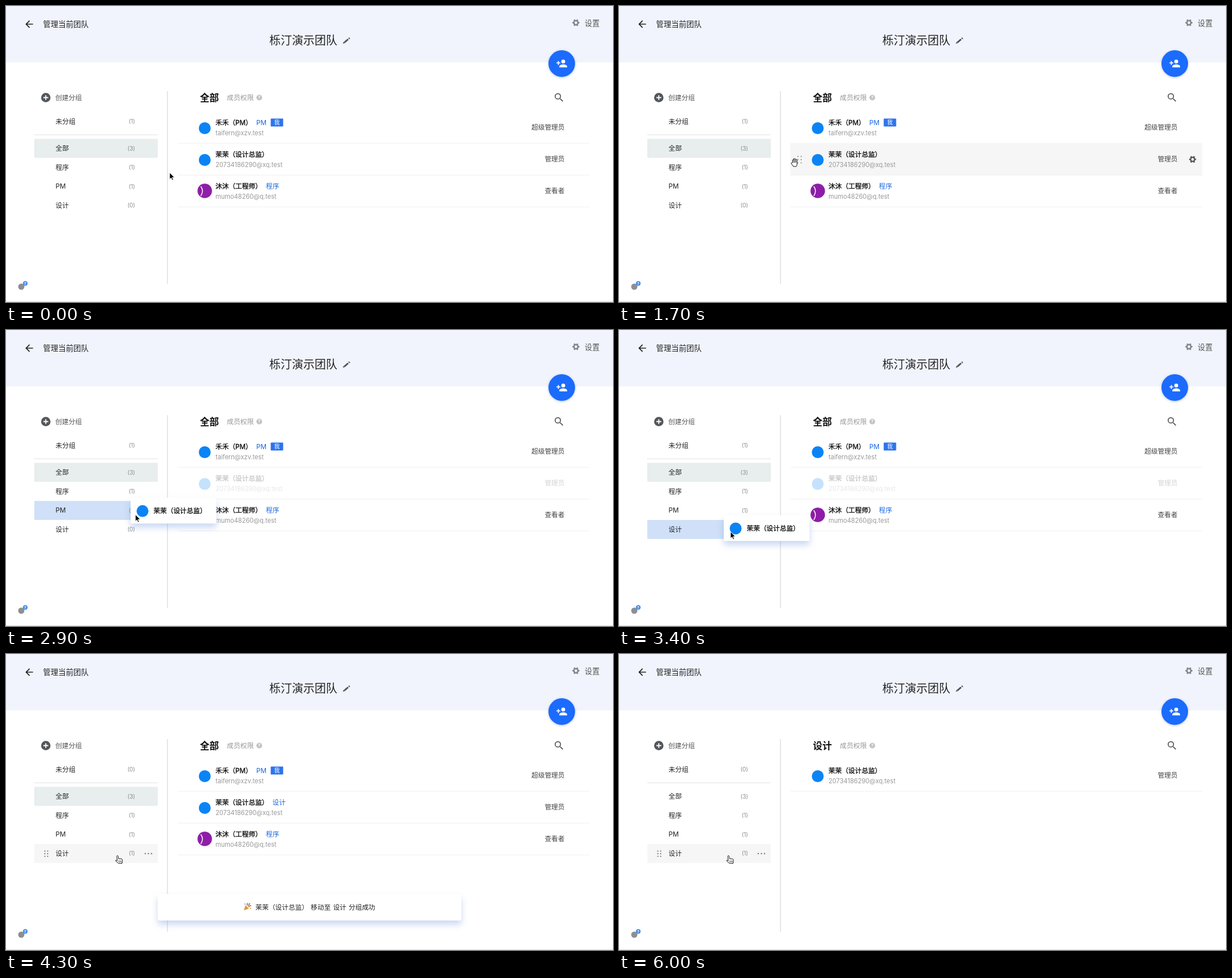
An HTML page that plays this animation: 1072 px wide and 522 px high, repeating every 7.1 s.

```html
<!DOCTYPE html>
<html lang="zh-CN">
<head>
<meta charset="utf-8">
<title>团队管理</title>
<style>
  html, body { margin: 0; width: 100%; height: 100%; overflow: hidden; background: #fff; }
  svg { display: block; width: 1072px; height: 522px; }
  text { font-family: Inter, "Noto Sans CJK SC", "Noto Sans CJK", sans-serif; white-space: pre; }
  .medium { stroke: #111; stroke-width: .35px; }
  .float { filter: drop-shadow(0 7px 6px rgba(80, 125, 215, .3)); }
  .fab { filter: drop-shadow(0 1.5px 2px rgba(20, 50, 120, .3)); }
  .cursor path { stroke-linejoin: round; stroke-linecap: round; }
</style>
</head>
<body>
<svg id="stage" viewBox="0 0 1072 522"></svg>
<script>
const LOOP = 7100, DRAG = 2600, DROP = 3600, OPEN = 5000, TOAST_OUT = 5300;
const BLUE = '#1a66e0', AVATAR = '#0a84f5';

// y is the visual middle of the line
const text = (x, y, str, size = 11.7, fill = '#222', extra = '') =>
  `<text x="${x}" y="${y + size * .37}" font-size="${size}" fill="${fill}" ${extra}>${str}</text>`;
const rect = (x, y, w, h, fill, extra = '') =>
  `<rect x="${x}" y="${y}" width="${w}" height="${h}" fill="${fill}" ${extra}/>`;
const circle = (x, y, r, fill, extra = '') =>
  `<circle cx="${x}" cy="${y}" r="${r}" fill="${fill}" ${extra}/>`;
const icon = (x, y, scale, fill, d) =>
  `<path transform="translate(${x} ${y}) scale(${scale})" fill="${fill}" d="${d}"/>`;
const gear = (x, y, color) =>
  circle(x, y, 3.6, 'none', `stroke="${color}" stroke-width="2.4"`) +
  circle(x, y, 5.3, 'none', `stroke="${color}" stroke-width="1.8" pathLength="12" stroke-dasharray="1" stroke-dashoffset=".5"`);
const grip = (x, y, dx, dy, color) => [0, 1].map(i => [-1, 0, 1].map(j =>
  circle(x + i * dx, y + j * dy, 1.15, color)).join('')).join('');
const group = (id, content, extra = '') => `<g id="${id}" ${extra}>${content}</g>`;
const help = (x, y, r, fill) =>
  circle(x, y, r, fill) + text(x, y, '?', r * 1.6, '#fff', 'text-anchor="middle" font-weight="700"');

const header =
  rect(0, 0, 1072, 99.5, '#f1f4fd') +
  icon(30.9, 21.9, .84, '#222', 'M20 11H7.83l5.59-5.59L12 4l-8 8 8 8 1.41-1.41L7.83 13H20z') +
  text(65.5, 32, '管理当前团队', 13.4) +
  text(465, 61, '栎汀演示团队', 20) +
  '<path d="M597.6 64.3l6.6-5.6M605.4 57.7l1.5-1.3" stroke="#555" stroke-width="2.9"/>' +
  '<path d="M594.8 66.6l1.3-3.6 2.2 2.5z" fill="#555"/>' +
  gear(1006.5, 29.5, '#808388') + text(1022, 30.5, '设置', 13.2, '#555') +
  circle(981.5, 101.5, 23.5, '#1b6bfd', 'class="fab"') +
  icon(971.2, 91, .86, '#fff', 'M15 12a4 4 0 1 0 0-8 4 4 0 0 0 0 8zm-9-2V7H4v3H1v2h3v3h2v-3h3v-2zm9 4c-2.67 0-8 1.34-8 4v2h16v-2c0-2.66-5.33-4-8-4z');

const groups = [['未分组', 203.5], ['全部', 251], ['程序', 284.5], ['PM', 318], ['设计', 351.5]];
const sidebar =
  circle(70.3, 161.5, 8.3, '#53575b') +
  '<path d="M66 161.5h8.6M70.3 157.2v8.6" stroke="#fff" stroke-width="1.8"/>' +
  text(87, 161.5, '创建分组', 11.75, '#555') +
  rect(50, 226.6, 218, 1, '#dfe2e2') + rect(284.6, 150, 1.2, 340, '#d8d8d8') +
  rect(50, 234.3, 218, 33.4, '#e7eeed', 'id="selected"') +
  rect(50, 335, 218, 33.4, '#cfe0f8', 'id="target"') +
  group('groupHover', rect(50, 335, 218, 33.4, '#f6f6f6') + grip(68.6, 352.2, 5, 4.6, '#777') +
    [246, 251.5, 257].map(x => circle(x, 352, 1.2, '#777')).join('')) +
  groups.map(([name, y], i) => text(87.5, y, name) +
    text(228, y, '', 10, '#8a8a8a', `id="count${i}" text-anchor="end"`)).join('') +
  circle(27, 495, 5.5, '#8c8f93') + help(34, 489.3, 4.2, '#4a90e8');

const members = [
  { name: '禾禾（PM）', mail: 'taifern@xzv.test', role: '超级管理员', tag: 'PM', tagX: 442, color: AVATAR },
  { name: '茉茉（设计总监）', mail: '20734186290@xq.test', role: '管理员', tag: '设计', tagX: 470.5, color: AVATAR },
  { name: '沐沐（工程师）', mail: 'mumo48260@q.test', role: '查看者', tag: '程序', tagX: 459, color: '#8e1ea8' },
];
const memberRow = (m, i) => {
  const y = 186 + 56 * i;
  const hover = i === 1 ? group('rowHover', rect(302.5, y, 727.5, 56, '#f6f6f6') +
    grip(316, y + 29, 5.8, 5.6, '#999') + gear(1013, y + 28.5, '#555')) : '';
  const mark = i === 2 ? '<path d="M344 318q6 8 0 17" fill="none" stroke="#fff" stroke-width="1.4"/>' : '';
  const badge = i === 0 ? rect(467.5, 198.5, 22, 14, '#2d74ec', 'rx="1"') + text(478.5, 205.5, '我', 10, '#fff', 'text-anchor="middle"') : '';
  return group('member' + i, hover + rect(303, y + 55.7, 727, 1, '#eef0f2') +
    group('info' + i,
      circle(351, y + (i === 2 ? 28 : 29.5), i === 2 ? 12.8 : 10.5, m.color) + mark + badge +
      text(370, y + 20, m.name, 11.7, '#111', 'class="medium"') +
      text(m.tagX, y + 20, m.tag, 11.7, BLUE, `id="tag${i}"`) +
      text(370, y + 38, m.mail, 11.1, '#999') +
      text(986.5, y + 28, m.role, 11.7, '#444', 'text-anchor="end"')));
};
const list =
  text(342.5, 161.5, '', 16.7, '#111', 'id="heading" font-weight="700"') +
  text(390, 161.5, '成员权限', 11.9, '#999') + help(447.3, 161.5, 5, '#c2c2c2') +
  icon(966.4, 151.1, .86, '#555', 'M15.5 14h-.79l-.28-.27A6.47 6.47 0 0 0 16 9.5 6.5 6.5 0 1 0 9.5 16c1.61 0 3.09-.59 4.23-1.57l.27.28v.79l5 4.99L20.49 19zm-6 0a4.5 4.5 0 1 1 0-9 4.5 4.5 0 0 1 0 9z') +
  members.map(memberRow).join('');

const popper =
  '<path d="M420 452l3-9 6 6z" fill="#d99a3c"/>' +
  '<path d="M425 443q2-1 1-4M428 446q3-3 5-2M427 444l4-4" fill="none" stroke="#b0503c" stroke-width="1.3"/>' +
  circle(422, 441, .9, '#4a90e8') + circle(432, 448.5, .9, '#c98a2c') + circle(429, 440, .8, '#6aa84f');
const toast = group('toast', rect(268, 423, 536, 47, '#fff', 'rx="3" class="float"') + popper +
  text(440.5, 447, members[1].name + ' 移动至 设计 分组成功', 11.7, '#222', 'word-spacing="1"'));

const card = group('card', rect(0, 0, 151.5, 45.5, '#fff', 'rx="2" class="float"') +
  circle(21, 23.5, 10.5, AVATAR) + text(40.5, 23, members[1].name, 11.7, '#111', 'class="medium"'));

const outline = 'fill="#fff" stroke="#111" stroke-width="1"';
const cursors =
  group('arrow', '<path d="M0 0V11.5L2.7 9l1.9 4.3 1.9-.8L4.6 8.3H8.2z" fill="#000" stroke="#fff" stroke-width=".8"/>', 'class="cursor"') +
  group('grab', `<path ${outline} d="M-3.5 0V-4q0-1 1-1t1 1V-6q0-1 1-1t1 1v.6q0-1 1-1t1 1v.9q0-1 1-1t1 1V2q0 3-1.5 5H-2L-6 1.5q0-1.5 1.5-1z"/>` +
    '<path d="M-1.5-4v4M.5-5v5M2.5-4.5V0" stroke="#111" stroke-width=".9"/>', 'class="cursor"') +
  group('pointer', `<path ${outline} d="M-1.4 1a1.2 1.2 0 0 1 2.4-.4L1.8 5l5 .2q1.8.4 1.7 2.3L8 13.2H1.6L-3.2 9q-.8-1.6.9-1.5l1.5.8z"/>` +
    '<path d="M2.2 8.5v2.5M4.2 8.5v2.5M6.2 8.5v2.5" stroke="#111" stroke-width=".7"/>', 'class="cursor"');

const stage = document.getElementById('stage');
stage.innerHTML = header + sidebar + list + toast + card + cursors + rect(0, 521, 1072, 1, '#ddd');

const el = id => document.getElementById(id);
const show = (id, on) => { el(id).style.display = on ? '' : 'none'; };
const place = (id, x, y) => el(id).setAttribute('transform', `translate(${x} ${y})`);
const clamp = v => Math.min(1, Math.max(0, v));
const easeOut = p => 1 - (1 - p) ** 2;

// keys: [time, x, y]
const cursorPath = [[1000, 289, 294], [1600, 310, 276], [2500, 310, 276], [2700, 268, 288], [3300, 197, 356], [4300, 197, 356], [4900, 193.5, 356]];
const cardPath = [[2500, 300, 246], [2700, 264, 257.5], [3300, 185, 326.5]];
function along(path, t) {
  const next = path.findIndex(key => key[0] > t);
  if (next < 1) return (next < 0 ? path[path.length - 1] : path[0]).slice(1);
  const a = path[next - 1], b = path[next];
  const p = easeOut((t - a[0]) / (b[0] - a[0]));
  return [a[1] + (b[1] - a[1]) * p, a[2] + (b[2] - a[2]) * p];
}

function render(t) {
  const [x, y] = along(cursorPath, t);
  const dragging = t >= DRAG && t < DROP, moved = t >= DROP, opened = t >= OPEN;
  const hovering = t < DRAG && x > 303;

  const kind = moved ? 'pointer' : hovering ? 'grab' : 'arrow';
  for (const id of ['arrow', 'grab', 'pointer']) show(id, id === kind);
  place(kind, x, y);

  const over = dragging && x < 266 ? groups.findIndex(g => Math.abs(y - g[1]) < 16.7) : -1;
  show('target', over > 1);
  if (over > 1) el('target').setAttribute('y', groups[over][1] - 16.5);
  show('selected', !opened);
  show('groupHover', moved);
  [moved ? 0 : 1, 3, 1, 1, moved ? 1 : 0].forEach((n, i) => { el('count' + i).textContent = `(${n})`; });

  el('heading').textContent = opened ? '设计' : '全部';
  show('member0', !opened);
  show('member2', !opened);
  place('member1', 0, opened ? -56 : 0);
  show('rowHover', hovering);
  show('tag1', moved && !opened);
  el('info1').style.opacity = dragging ? .23 : 1;

  show('card', dragging);
  place('card', ...along(cardPath, t));

  const shown = easeOut(clamp((t - DROP) / 300)) * (1 - clamp((t - TOAST_OUT) / 300) ** 2);
  show('toast', shown > 0);
  el('toast').style.opacity = shown;
  place('toast', 0, 40 * (1 - shown));
}

// the picture advances ten times a second
const start = performance.now();
function tick() {
  const t = (performance.now() - start) % LOOP;
  render(Math.floor(t / 100) * 100);
  requestAnimationFrame(tick);
}
tick();
</script>
</body>
</html>
```
